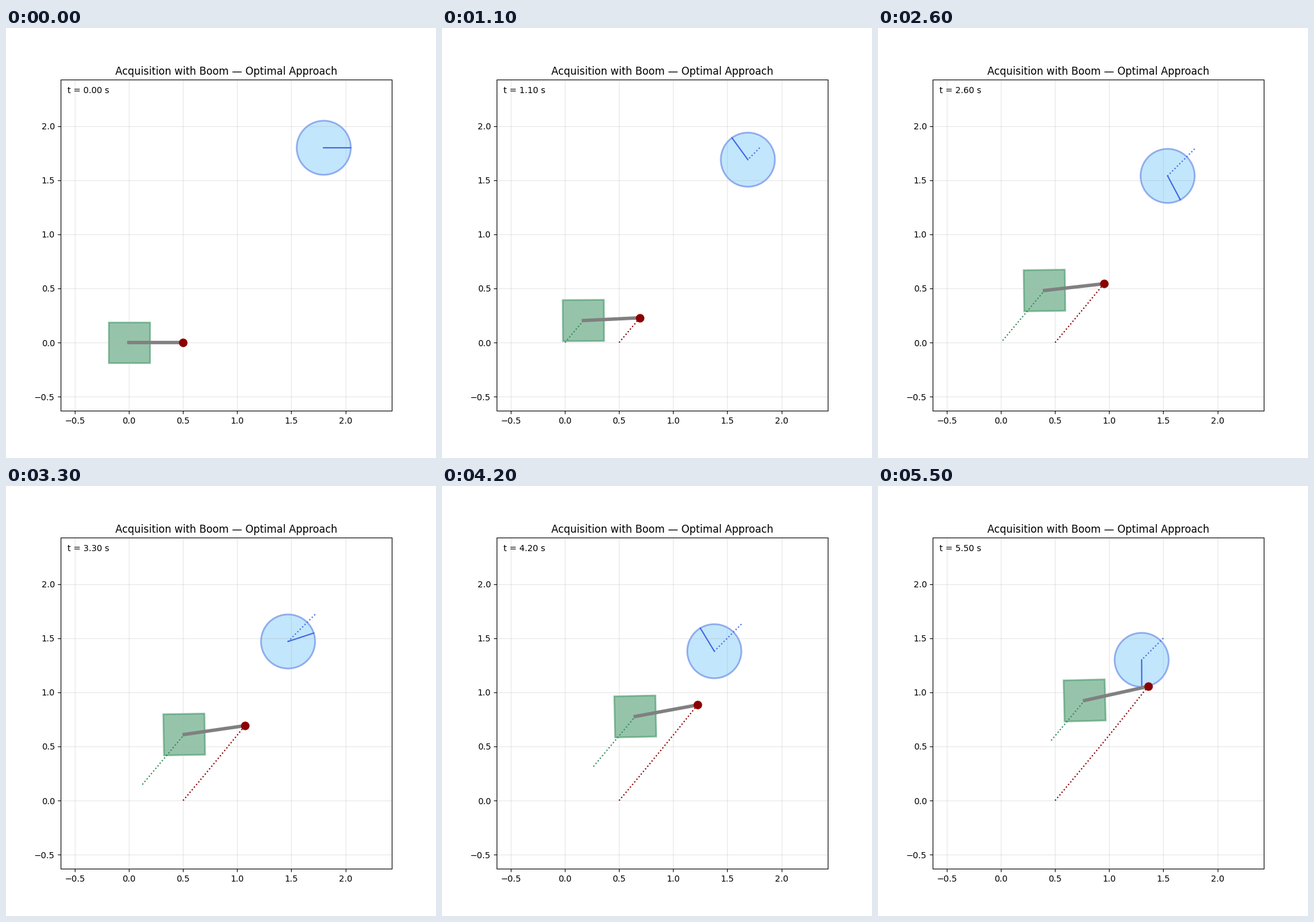
Write a matplotlib script that moves like this. It is 700 px wide and 700 px high and loops after 5600 ms.

```python
import numpy as np
import matplotlib.pyplot as plt
from matplotlib.animation import FuncAnimation
from matplotlib.patches import Circle, Polygon

DT = 0.1
FRAMES = 56
T_CATCH = 5.0       # both craft hold position from here on
TRAIL = 25          # steps kept in the craft trails
RADIUS = 0.25
SIDE = 0.38
SPIN = 2.0

t = np.arange(FRAMES) * DT
held = np.minimum(t, T_CATCH)


def polar(r, angle):
    return np.stack([r * np.cos(angle), r * np.sin(angle)], axis=-1)


target = 1.8 - 0.1 * np.stack([held, held], axis=-1)
spoke = target + polar(RADIUS, SPIN * t)
chaser = held[:, None] * [0.1546, 0.185]
tip = chaser + polar(0.5 + 0.02 * held, 0.0435 * held)
tilt = 0.005 * held

fig, ax = plt.subplots(figsize=(7, 7), dpi=100)
ax.set_aspect("equal")
ax.set_xlim(-0.63, 2.43)
ax.set_ylim(-0.63, 2.43)
ax.grid(True, alpha=0.3)
ax.set_title("Acquisition with Boom — Optimal Approach")

disc = ax.add_patch(Circle((1.8, 1.8), RADIUS, fc="lightskyblue",
                           ec="royalblue", lw=2, alpha=0.5))
body = ax.add_patch(Polygon(np.zeros((4, 2)), closed=True, fc="seagreen",
                            ec="seagreen", lw=2, alpha=0.5))


def line(color, lw=1.5, **kw):
    return ax.plot([], [], color=color, lw=lw, **kw)[0]


spoke_line = line("royalblue")
target_trail = line("royalblue", ls=":")
chaser_trail = line("seagreen", ls=":")
tip_trail = line("darkred", ls=":")
boom = line("gray", lw=4)
grip = line("darkred", marker="o", markersize=9)
clock = ax.text(0.02, 0.98, "", transform=ax.transAxes, va="top")


def square(center, angle):
    corners = angle + np.pi / 4 + np.arange(4) * np.pi / 2
    return center + polar(SIDE / np.sqrt(2), corners)


def update(i):
    first = max(0, i - TRAIL)
    disc.center = target[i]
    body.set_xy(square(chaser[i], tilt[i]))
    spoke_line.set_data(*zip(target[i], spoke[i]))
    boom.set_data(*zip(chaser[i], tip[i]))
    grip.set_data([tip[i, 0]], [tip[i, 1]])
    target_trail.set_data(*target[first:i + 1].T)
    chaser_trail.set_data(*chaser[first:i + 1].T)
    tip_trail.set_data(*tip[:i + 1].T)
    clock.set_text(f"t = {t[i]:.2f} s")
    return (disc, body, spoke_line, boom, grip,
            target_trail, chaser_trail, tip_trail, clock)


anim = FuncAnimation(fig, update, frames=FRAMES, interval=100,
                     repeat=True, repeat_delay=0)
plt.show()
```
